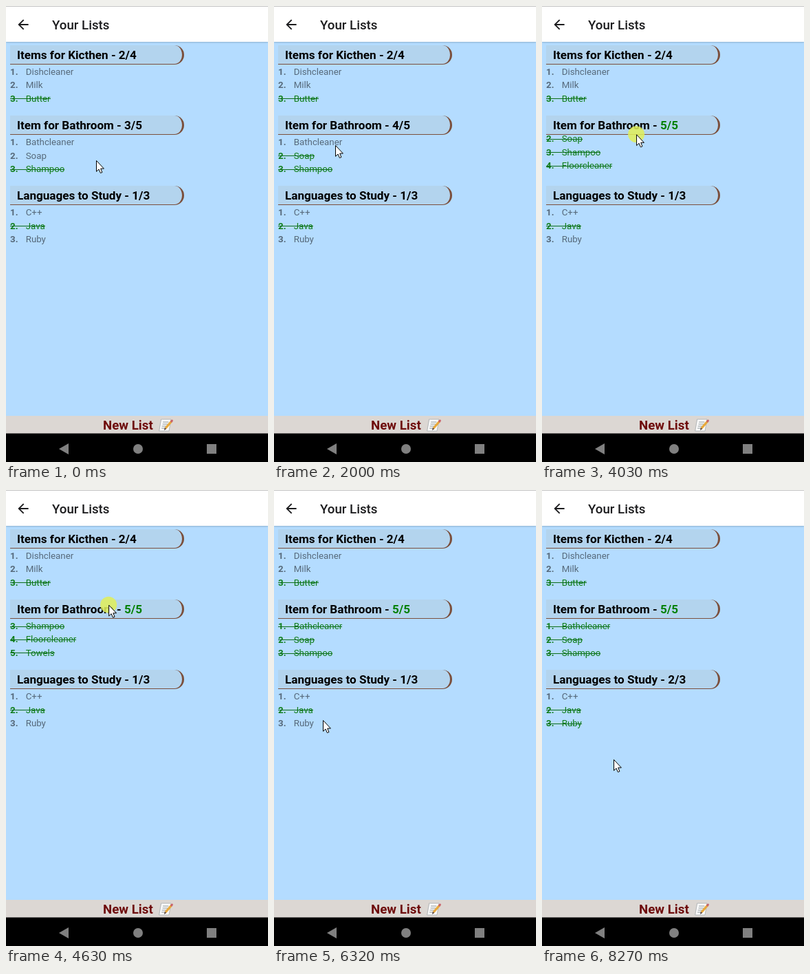
An HTML page that plays this animation: 381x662 px, repeating every 8540 ms.

```html
<!DOCTYPE html>
<html lang="en">
<head>
<meta charset="utf-8">
<title>Your Lists</title>
<style>
html, body { margin: 0; width: 100%; height: 100%; overflow: hidden; }
body { position: relative; background: #b4dcff; font-family: Roboto, sans-serif; }
body > *, .list, .rows { position: absolute; white-space: pre; }
#top { left: 0; top: 0; width: 381px; height: 52px; background: #fff; box-shadow: 0 1px 2px #5a789070, inset 0 1px #c4c4c4; }
#title { left: 67px; top: 14px; font: 500 18.7px/28px Roboto, sans-serif; color: #1c1c1e; }
.list { left: 6px; width: 253px; }
.head { box-sizing: border-box; height: 28px; padding-left: 10px; font: bold 17.1px/28px Roboto, sans-serif; color: #000;
  background: #b3d4ee; border: solid #7b4f3c; border-width: 0 3px 1px 0; border-radius: 0 14px 14px 0; }
.rows { left: 0; top: 29px; width: 253px; height: 57px; overflow: hidden; }
.row { position: relative; width: max-content; height: 19.4px; font-size: 13.3px; line-height: 19.4px; color: #56697a; }
.row b { display: inline-block; width: 22.7px; }
.row.done { color: #0e7d18; }
.row.done::after { content: ""; position: absolute; left: 0; right: 0; top: 9.6px; height: 1px; background: #0b6d16; }
.full { color: #008000; }
#add { left: 0; top: 595px; width: 381px; height: 26px; background: #dcd7d3; }
#add span { position: absolute; left: 141px; top: 1px; font: bold 18.7px/26px Roboto, sans-serif; color: #6e0b0b; }
#art { left: 0; top: 0; }
</style>
</head>
<body>
<div id="top"></div>
<div id="title">Your Lists</div>
<div id="add"><span>New List</span></div>
<svg id="art" width="381" height="662">
  <path transform="translate(13.6 15.6) scale(.95)" fill="#1c1c1e" d="M20 11H7.83l5.59-5.59L12 4l-8 8 8 8 1.41-1.41L7.83 13H20z"/>
  <rect y="620.5" width="381" height="42"/>
  <g fill="#808080">
    <path d="M77 643L91 635V651Z"/>
    <circle cx="192" cy="643" r="7"/>
    <rect x="292" y="636" width="14" height="14"/>
  </g>
  <g stroke-linecap="round">
    <path d="M226 600H240L237 617H223Z" fill="#fafafa" stroke="#b4b8ba"/>
    <path d="M228.5 604H236M228 607H235M227 610H233M226.5 613H231" stroke="#8d979c"/>
    <path d="M232 613L241 602.5" stroke="#e8a93c" stroke-width="3.4" stroke-linecap="butt"/>
    <path d="M240.6 603L241.4 602" stroke="#c9646c" stroke-width="3"/>
    <path d="M230 616L230.8 612L233.3 614.1Z" fill="#574238"/>
  </g>
  <circle id="halo" r="12" fill="#e0ee58" fill-opacity=".85"/>
  <path id="mouse" d="M.5 .5V16.3L4 13L6.4 18.5L8.9 17.5L6.7 12.1H11.4Z" fill="#fff" stroke="#000"/>
</svg>
<script>
const $ = id => document.getElementById(id);
const clamp = (v, lo, hi) => Math.max(lo, Math.min(hi, v));
const LOOP = 8540, TAP = 200;
const DRAG = { from: 3650, turn: 4900, to: 5560 };

// Each item: name, time it is ticked off
const lists = [
  { name: "Items for Kicthen", items: [["Dishcleaner"], ["Milk"], ["Butter", 0], ["Bread", 0]] },
  { name: "Item for Bathroom", items: [["Bathcleaner", 2400], ["Soap", 1330], ["Shampoo", 0], ["Floorcleaner", 0], ["Towels", 0]] },
  { name: "Languages to Study", items: [["C++"], ["Java", 0], ["Ruby", 6730]] }
];
const taps = lists.flatMap(list => list.items).map(item => item[1]).filter(Boolean);

// Pointer moves: start, end, x, y; it rests in between
const home = [131, 224];
const moves = [
  [390, 1260, 56, 216],
  [1500, 2000, 89, 202],
  [2600, 3020, 59, 231],
  [3240, 3650, 128, 218],
  [3650, 4120, 138, 183],
  [4120, 4360, 143, 182],
  [4570, 4690, 155, 152],
  [4960, 5360, 91, 260],
  [5770, 6050, 107, 296],
  [6050, 6320, 71, 334],
  [6320, 6660, 43, 342],
  [6930, 7400, 102, 364],
  [7540, 7740, 102, 383],
  [8140, 8270, 104, 391]
];

function add(parent, cls) {
  const el = document.createElement("div");
  el.className = cls;
  return parent.appendChild(el);
}

lists.forEach((list, i) => {
  const box = add(document.body, "list");
  box.style.top = 57 + 102.2 * i + "px";
  const head = add(box, "head");
  head.textContent = list.name + " - ";
  list.count = head.appendChild(document.createElement("span"));
  const rows = add(box, "rows");
  list.rows = list.items.map(([name], n) => {
    const row = add(rows, "row");
    row.innerHTML = `<b>${n + 1}.</b>${name}`;
    return row;
  });
});
document.body.append($("art"));

function pointer(t) {
  let [x, y] = home;
  for (const [from, to, x1, y1] of moves) {
    const k = clamp((t - from) / (to - from), 0, 1);
    const ease = k * k * (3 - 2 * k);
    x += (x1 - x) * ease;
    y += (y1 - y) * ease;
  }
  return [x, y];
}

// The list follows the dragged pointer up, then back down
function scroll(t, y) {
  if (t < DRAG.from || t > DRAG.to) return 0;
  return clamp((t < DRAG.turn ? 210.5 : 191) - y, 0, 39);
}

function draw(t) {
  for (const { items, rows, count } of lists) {
    const done = items.map(item => t >= item[1]);
    const n = done.filter(Boolean).length;
    rows.forEach((row, i) => row.classList.toggle("done", done[i]));
    count.textContent = `${n}/${items.length}`;
    count.className = n === items.length ? "full" : "";
  }
  const [x, y] = pointer(t);
  const shift = scroll(t, y);
  for (const row of lists[1].rows) row.style.top = -shift + "px";
  for (const id of ["mouse", "halo"]) $(id).setAttribute("transform", `translate(${x} ${y})`);
  const pressed = taps.some(tap => t >= tap && t < tap + TAP) || (t >= DRAG.from && t < DRAG.to);
  $("halo").style.display = pressed ? "" : "none";
}

const start = performance.now();
function tick() {
  draw((performance.now() - start) % LOOP);
  requestAnimationFrame(tick);
}
tick();
</script>
</body>
</html>
```
